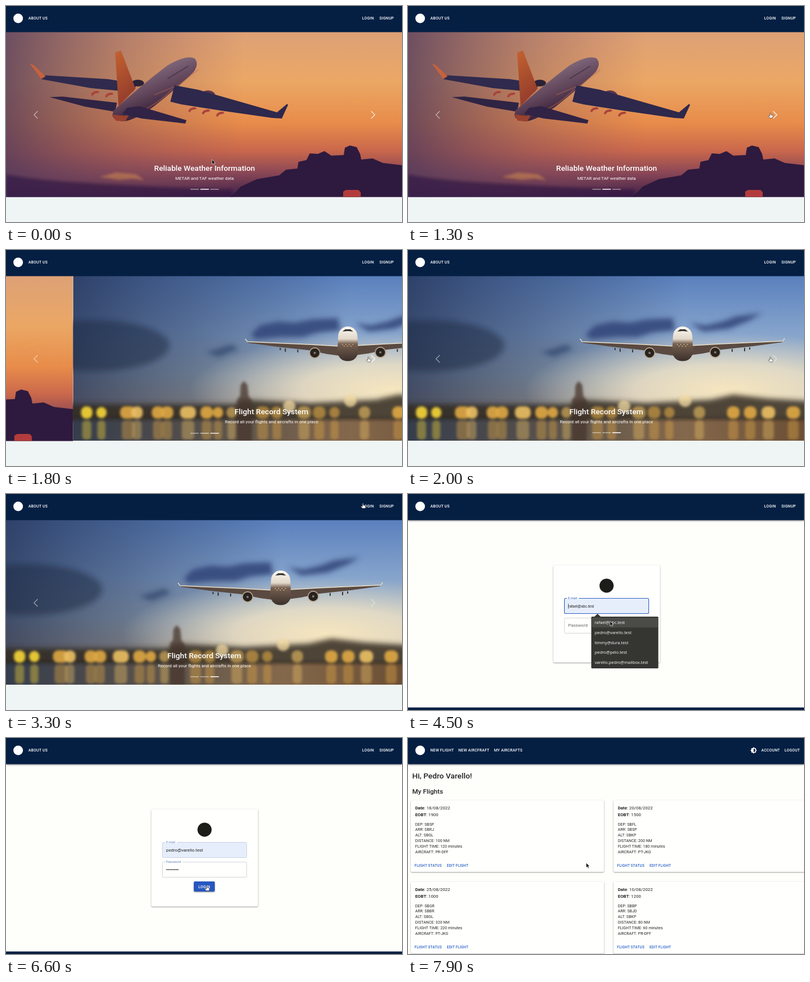
An HTML page that plays this animation: 700 px wide and 384 px high, repeating every 8 s.

```html
<!DOCTYPE html>
<html lang="en">
<head>
<meta charset="utf-8">
<title>Flight records</title>
<style>
html, body { margin: 0; width: 100%; height: 100%; overflow: hidden; background: #fefefb; }
svg { display: block; width: 700px; height: 384px; font-family: Roboto, "Noto Sans", sans-serif; }
.btn { font-size: 6.86px; font-weight: 500; letter-spacing: .0286em; fill: #fff; }
.small { font-size: 6.37px; fill: #2a62c8; }
.h { font-size: 13.7px; font-weight: 500; }
.p { font-size: 7.84px; }
.b { font-size: 6.86px; letter-spacing: .0107em; }
.cap { fill: #fff; text-anchor: middle; }
.menu { font: 7.4px "Open Sans", "Noto Sans", sans-serif; fill: #fff; }
.paper { fill: #fffffd; filter: drop-shadow(0 1px 1px #0006); }
.chev { fill: none; stroke: #fff; stroke-width: 1.2; }
</style>
</head>
<body>
<svg id="stage" viewBox="0 0 700 384">
<defs>
  <linearGradient id="dusk" x2="0" y2="1">
    <stop offset="0" stop-color="#dda176"/><stop offset=".3" stop-color="#eba765"/>
    <stop offset=".55" stop-color="#e88c4a"/><stop offset=".72" stop-color="#c9674c"/>
    <stop offset=".86" stop-color="#874556"/><stop offset="1" stop-color="#3b1f48"/>
  </linearGradient>
  <linearGradient id="duskLeft">
    <stop offset="0" stop-color="#513a5c" stop-opacity=".8"/>
    <stop offset=".3" stop-color="#754a5c" stop-opacity=".4"/>
    <stop offset=".6" stop-color="#8a5060" stop-opacity="0"/>
  </linearGradient>
  <linearGradient id="body" x1=".35" y1=".25" x2=".65" y2=".8">
    <stop offset="0" stop-color="#80677a"/><stop offset=".5" stop-color="#604459"/>
    <stop offset="1" stop-color="#321c35"/>
  </linearGradient>
  <linearGradient id="fin" x2=".3" y2="1">
    <stop offset="0" stop-color="#c4622f"/><stop offset="1" stop-color="#933c2c"/>
  </linearGradient>
  <linearGradient id="sky" x2="0" y2="1">
    <stop offset="0" stop-color="#5a80bd"/><stop offset=".35" stop-color="#86a4cc"/>
    <stop offset=".6" stop-color="#a3b0b8"/><stop offset=".75" stop-color="#b5aa98"/>
  </linearGradient>
  <linearGradient id="skyLeft">
    <stop offset="0" stop-color="#1f2c4e" stop-opacity=".75"/>
    <stop offset=".3" stop-color="#2b3d62" stop-opacity=".5"/>
    <stop offset=".7" stop-color="#2b3d62" stop-opacity="0"/>
  </linearGradient>
  <linearGradient id="water">
    <stop offset="0" stop-color="#353d4c"/><stop offset=".4" stop-color="#5d544c"/>
    <stop offset=".7" stop-color="#84684c"/><stop offset="1" stop-color="#6b4f35"/>
  </linearGradient>
  <radialGradient id="glow">
    <stop offset="0" stop-color="#f6e6bf"/><stop offset=".45" stop-color="#efe3c8" stop-opacity=".8"/>
    <stop offset="1" stop-color="#dcdcd4" stop-opacity="0"/>
  </radialGradient>
  <linearGradient id="jet" x2="0" y2="1">
    <stop offset="0" stop-color="#fbf7ef"/><stop offset=".36" stop-color="#e2d8ca"/>
    <stop offset=".5" stop-color="#766050"/><stop offset="1" stop-color="#3b302c"/>
  </linearGradient>
  <filter id="soft" x="-50%" y="-50%" width="200%" height="200%"><feGaussianBlur stdDeviation="2"/></filter>
  <filter id="haze" x="-50%" y="-80%" width="200%" height="260%"><feGaussianBlur stdDeviation="5"/></filter>
  <clipPath id="photo"><rect y="46" width="700" height="292.6"/></clipPath>
  <clipPath id="tall"><rect y="46" width="700" height="293.6"/></clipPath>
</defs>
<rect width="700" height="384" fill="#fefefb"/>

<g id="home">
  <rect y="46" width="700" height="338" fill="#eff4f4"/>
  <g id="sunset" clip-path="url(#tall)">
    <rect y="46" width="700" height="293.6" fill="url(#dusk)"/>
    <rect y="46" width="700" height="293.6" fill="url(#duskLeft)"/>
    <g filter="url(#soft)">
      <path d="M600 173l25-7 20-2-18 7zM165 304l30-8 35 3 15 11-20-3-25 2z" fill="#f0a24c" opacity=".4"/>
      <path d="M0 300q60 10 130 14t150 8 120 4v16H0z" fill="#2c1840" opacity=".6"/>
    </g>
    <path d="M395 342l20-21 28-13 40-7 12-10 20-2 2-12 14-3 6-12 14 1 12-5 12 8 22-1 2-13 9-4 12 3 6 12 2 10 20-2 18 8 34 4v60z" fill="#2e1a3e"/>
    <path d="M596 340v-10l5-3h22l4 4v9z" fill="#b23c3c"/>
    <path d="M48 110l18 13 114 7 52 8-8 15-74-7-88-16z" fill="#302a4d"/>
    <path d="M42 102l7 3 21 20-8 5z" fill="#c5623e"/>
    <path d="M77 162l23-1 96 11-3 16-53-9z" fill="#2f2444"/>
    <ellipse cx="233" cy="137" rx="11" ry="6" fill="#2b2238"/>
    <ellipse cx="357" cy="159" rx="13" ry="9" fill="#59364a"/>
    <path d="M190 186Q240 140 285 106 318 86 333 93 342 102 332 117 305 144 262 178 228 203 208 205 190 204 188 194z" fill="url(#body)"/>
    <path d="M262 158l44-18 34-27M210 196q45-9 84-48" fill="none" stroke="#b4674f" stroke-width="2" opacity=".45"/>
    <path d="M286 129l36-22" stroke="#3c2840" stroke-width="2" stroke-dasharray="2 1.4"/>
    <path d="M298 141l42 8 139 40 18-15 1.500 2-11 24-17-1-90-13-70-11-20-5z" fill="#2d284c"/>
    <path d="M214 181l21-3 84 25-2 6-77-9-35-8z" fill="#302345"/>
    <path d="M188 193l28 3-5 9-17-1z" fill="#9a412e"/>
    <path d="M193 83l10-4 26 68-30 31z" fill="url(#fin)"/>
    <g id="pods" fill="#a9423b"></g>
    <text class="cap h" x="351" y="293">Reliable Weather Information</text>
    <text class="cap p" x="351" y="309">METAR and TAF weather data</text>
  </g>
  <g id="city">
    <g clip-path="url(#photo)">
      <rect y="46" width="700" height="292.6" fill="url(#sky)"/>
      <rect y="46" width="700" height="292.6" fill="url(#skyLeft)"/>
      <ellipse cx="565" cy="248" rx="360" ry="100" fill="url(#glow)"/>
      <g filter="url(#haze)">
        <ellipse cx="40" cy="170" rx="130" ry="45" fill="#1a273a" opacity=".45"/>
        <path d="M314 150l16-16 32-7 30 2 30-6 46-2 4 22-40 4-26 8-40 0-44 4zM498 130l28 4 30-7 24-9 46-6-24 14-34 14-46 5z" fill="#354a7c" opacity=".9"/>
        <path d="M235 182l45-14 12 8-35 14z" fill="#354a70" opacity=".8"/>
        <path d="M-20 274H285l15-8 120 6 115-6 40-9 60 7 100 6v35H-20z" fill="#33281f" opacity=".85"/>
      </g>
      <rect y="299" width="700" height="40" fill="url(#water)"/>
      <g filter="url(#soft)">
        <path d="M290 340v-74l5-6 1-20 6-7 6 7 2 20 6 8v72z" fill="#47372d" opacity=".75"/>
        <path d="M-10 300H710" stroke="#2b2420" stroke-width="5" opacity=".6"/>
      </g>
      <g id="lights" filter="url(#soft)"></g>
    </g>
    <g id="wings"></g>
    <path d="M468.500 153a17 17 0 0 1 34 0l1.500 28q-3 16.500-18.500 16.500t-18.500-16.500z" fill="url(#jet)"/>
    <path d="M476 145l5-4h9l5 4-9.500-1z" fill="#31302f"/>
    <path d="M475 168h20M478 171h14" stroke="#f6d9a0" stroke-dasharray="2 4"/>
    <text class="cap h" x="350.500" y="291.500">Flight Record System</text>
    <text class="cap p" x="350.800" y="307.500">Record all your flights and aircrafts in one place</text>
  </g>
  <g id="bars"></g>
  <path class="chev" d="M56 187l-6.500 6.500 6.500 6.500" opacity=".55"/>
  <path class="chev" id="next" d="M645.500 187l6.500 6.500-6.500 6.500"/>
</g>

<g id="login">
  <rect class="paper" x="257" y="126.500" width="188.500" height="173" rx="2"/>
  <circle cx="351" cy="163" r="12.500" fill="#1c1c18"/>
  <rect id="mailBox" x="276.500" y="185.500" width="149" height="27" rx="2"/>
  <rect id="mailNotch" x="281" y="184" width="21" height="3" fill="#fffffd"/>
  <text id="mailLabel" x="283"></text>
  <text id="mail" x="283" y="202"></text>
  <path id="caret" d="M283.500 195v9" stroke="#222" stroke-width=".7"/>
  <rect x="276.500" y="220.500" width="149" height="27" rx="2" fill="#fffffd" id="passBox"/>
  <rect id="passNotch" x="281" y="219" width="31" height="3" fill="#fffffd"/>
  <text id="passLabel" x="283"></text>
  <g id="dots" fill="#222"></g>
  <rect x="332" y="255" width="37" height="18" rx="2" fill="#2757c0" style="filter:drop-shadow(0 1px 1px #0007)"/>
  <text class="btn" x="340" y="266.500">LOGIN</text>
  <g id="menu">
    <path d="M329 218.500l6-5.500 6 5.500z" fill="#353531"/>
    <rect x="324" y="218" width="118.500" height="92" rx="1.500" fill="#353531"/>
    <rect id="hover" x="325" width="116.500" height="17.500" fill="#4b4b47"/>
  </g>
  <rect y="379.500" width="700" height="5" fill="#051f43"/>
</g>

<g id="flights">
  <text class="h" x="7.500" y="72" fill="#222">Hi, Pedro Varello!</text>
  <text x="7.500" y="99" fill="#222" font-size="11.760" font-weight="500">My Flights</text>
</g>

<rect id="header" width="700" height="46.500" fill="#051f43"/>
<circle cx="21.500" cy="22" r="8.500" fill="#fff"/>
<g id="guest"></g>
<g id="member">
  <path d="M607 18h8v8h-8zM611 16.300l5.700 5.700-5.700 5.700-5.700-5.700z" fill="#fff"/>
  <path d="M611 19a3 3 0 0 1 0 6z" fill="#051f43"/>
</g>

<g id="cursor">
  <path id="arrow" d="M0 0v8.500l2-1.800 1.400 3 1.500-.7-1.400-2.900h2.700z" fill="#111" stroke="#fff" stroke-width=".6"/>
  <path id="hand" d="M-.8 0q.8-.8 1.600 0v3l3 .8q.9.300.8 1.300l-.5 3.400H-1l-2.600-3.300q.4-1.200 1.600-.4l1.200.7z" fill="#fff" stroke="#222" stroke-width=".6"/>
  <path id="beam" d="M-1.500-4h3M0-4v8M-1.500 4h3" stroke="#333" stroke-width=".7"/>
</g>
</svg>
<script>
const $ = id => document.getElementById(id);
const add = (id, html) => $(id).insertAdjacentHTML('beforeend', html);
const show = (id, on) => $(id).style.display = on ? '' : 'none';
const set = (id, attrs) => { for (const k in attrs) $(id).setAttribute(k, attrs[k]); };
const text = (cls, x, y, s) => `<text class="${cls}" x="${x}" y="${y}">${s}</text>`;
const ramp = (t, a, b) => Math.min(1, Math.max(0, (t - a) / (b - a)));
const ease = x => x * x * (3 - 2 * x);
const mix = (a, b, p) => a + (b - a) * p;

// Photo details
for (const [x, y] of [[157, 154], [182, 157], [329, 183], [353, 187], [378, 191]])
  add('pods', `<path d="M${x - 7} ${y + 4}q3-8 13-7l2 3-9 2-3 4z"/>`);
const lamps = [[24, 10], [50, 9], [97, 14], [113, 10], [150, 11], [166, 11], [203, 14], [236, 11], [256, 9], [280, 9],
  [335, 12], [360, 10], [408, 12], [435, 11], [462, 9], [515, 10], [575, 11], [605, 11], [637, 12], [681, 12]];
lamps.forEach(([x, r], i) => {
  const color = i < 2 ? '#f6d638' : i % 3 ? '#e0a844' : '#ecc064';
  const h = Math.min(r + 1, 11);
  add('lights', `<rect x="${x - r}" y="${289 - h}" width="${2 * r}" height="${2 * h}" rx="9" fill="${color}" opacity="${x < 270 || x > 560 ? .9 : .6}"/>
    <rect x="${x - r * .8}" y="303" width="${r * 1.6}" height="34" rx="6" fill="${color}" opacity=".4"/>`);
});
for (const [x, y] of [[382, 278], [490, 268]])
  add('lights', `<circle cx="${x}" cy="${y}" r="11" fill="#f2d9a0" opacity=".75"/>`);
const wing = `<path d="M303 157l6 6 110 5 52 3v17l-22-3-34-7-55-6-51-7z" fill="#5a4a41"/>
  <path d="M304 158l4 5 110 5 52 3" fill="none" stroke="#eadfcb" stroke-width="1.400"/>
  <path d="M375 175v6M397 177v5M366 174v4" stroke="#40362f" stroke-width="2"/>
  <circle cx="427" cy="183" r="10" fill="#bba890"/><circle cx="427" cy="183" r="8.300" fill="#28231f"/>
  <circle cx="427" cy="183" r="2" fill="#8b7c6d"/>`;
add('wings', wing + `<g transform="matrix(-1 0 0 1 970 -1)">${wing}</g>`);
for (let i = 0; i < 3; i++)
  add('bars', `<rect x="${326 + 17.6 * i}" y="325" width="15" height="1.500" fill="#fff"/>`);
const bars = [...$('bars').children];

// Navigation, form and flight cards
const nav = (id, items) => items.forEach(([x, s]) => add(id, text('btn', x, 24.4, s)));
nav('guest', [[39.5, 'ABOUT US'], [629.5, 'LOGIN'], [660, 'SIGNUP']]);
nav('member', [[39.5, 'NEW FLIGHT'], [89, 'NEW AIRCFRAFT'], [152, 'MY AIRCRAFTS'], [624.5, 'ACCOUNT'], [665.5, 'LOGOUT']]);

const mails = ['rafael@abc.test', 'pedro@varello.test', 'timmy@dura.test', 'pedro@pelo.test', 'varello.pedro@mailbox.test'];
mails.forEach((m, i) => add('menu', text('menu', 330, 231.3 + 17.7 * i, m)));
for (let i = 0; i < 8; i++) add('dots', `<circle cx="${284.5 + 2.75 * i}" cy="234" r="1"/>`);

const flights = [
  ['18/08/2022', 1900, 'SBSP', 'SBRJ', 'SBGL', 100, 120, 'PR-DFF'],
  ['20/08/2022', 1500, 'SBFL', 'SBSP', 'SBKP', 200, 180, 'PT-JKG'],
  ['25/08/2022', 1000, 'SBGR', 'SBBR', 'SBGL', 320, 220, 'PT-JKG'],
  ['10/08/2022', 1200, 'SBBP', 'SBJD', 'SBKP', 80, 60, 'PR-DFF']];
flights.forEach(([date, eobt, dep, arr, alt, dist, mins, craft], i) => {
  const x = i % 2 * 358.3, y = (i >> 1) * 145.2;
  const lines = [`DEP: ${dep}`, `ARR: ${arr}`, `ALT: ${alt}`, `DISTANCE: ${dist} NM`, `FLIGHT TIME: ${mins} minutes`, `AIRCRAFT: ${craft}`];
  add('flights', `<g transform="translate(${x} ${y})" fill="#222">
    <rect class="paper" x="5" y="110.500" width="341.500" height="127.500" rx="2"/>` +
    text('p', 12.7, 127.2, `<tspan font-weight="700">Date</tspan>: ${date}`) +
    text('p', 12.7, 138.7, `<tspan font-weight="700">EOBT</tspan>: ${eobt}`) +
    lines.map((s, k) => text('b', 12.7, 155.5 + 9.8 * k, s)).join('') +
    text('btn small', 11.5, 228.6, 'FLIGHT STATUS') + text('btn small', 68.7, 228.6, 'EDIT FLIGHT') + '</g>');
});

// Pointer path: time, x, y
const path = [[0, 364, 273], [300, 364, 273], [1100, 640.5, 190.5], [2700, 640.5, 190.5], [3200, 631, 17], [3400, 631, 17],
  [3600, 475, 105], [4000, 345, 199], [4200, 345, 199], [4400, 357, 226], [4600, 357, 226], [4900, 358, 243],
  [6000, 358, 243], [6400, 355, 263], [7300, 355, 263], [7600, 326, 213], [7900, 315, 222], [8000, 315, 222]];

function pointer(t) {
  const i = path.findIndex((k, n) => n && t <= k[0]);
  const [a, b] = [path[i - 1], path[i]], p = ease(ramp(t, a[0], b[0]));
  return [mix(a[1], b[1], p), mix(a[2], b[2], p)];
}

function label(id, s, p, yRest, yTop, color) {
  set(id, { y: mix(yRest, yTop, p), 'font-size': mix(7.84, 5.88, p), fill: color });
  $(id).textContent = s;
}

function draw(t) {
  const home = t < 3400, login = t >= 3400 && t < 6700, member = t >= 6700;
  show('home', home); show('login', login); show('flights', member);
  show('guest', !member); show('member', member);
  $('header').style.filter = home ? '' : 'drop-shadow(0 1px 1.5px #0008)';

  const [x, y] = pointer(t);
  const onNext = home && x > 615 && y > 60;
  const onLink = home && x > 625 && y < 30;
  const onField = login && x > 276 && x < 426 && (t < 4200 ? y > 185 && y < 213 : t >= 5200 && y < 248);
  const onButton = login && t > 5200 && y > 255;
  const hand = onNext || onLink || onButton;
  set('cursor', { transform: `translate(${x} ${y})` });
  show('hand', hand); show('beam', onField); show('arrow', !hand && !onField);

  const swap = ramp(t, 1357, 1957), slide = ease(swap);
  set('sunset', { transform: `translate(${-700 * slide} 0)` });
  set('city', { transform: `translate(${700 - 700 * slide} 0)` });
  show('sunset', slide < 1); show('city', slide > 0);
  set('bars', { transform: `translate(0 ${slide < 1 ? 0 : -1})` });
  [.5, 1 - swap / 2, .5 + swap / 2].forEach((o, i) => bars[i].setAttribute('opacity', o));
  set('next', { opacity: slide === 1 ? .45 : onNext ? .95 : .8 });

  const focus = t >= 4100 && t < 5500, open = t >= 4200 && t < 5200, filled = t >= 5200;
  const pick = t >= 4750 ? 1 : 0, preview = open && t >= 4400;
  const up = ease(ramp(t, 4000, 4200)), passUp = ease(ramp(t, 5400, 5700));
  set('mailBox', {
    fill: preview || filled ? '#e7eefb' : '#fffffd',
    stroke: focus ? '#2d60c4' : filled ? '#b3c2df' : '#c4c4c2', 'stroke-width': focus ? 1.1 : .7
  });
  set('passBox', { stroke: '#c2c4c6', 'stroke-width': .7 });
  show('mailNotch', up > .5); show('passNotch', passUp > .5);
  label('mailLabel', 'E-mail', up, 202, 187, focus ? '#2d60c4' : filled ? '#5d7bc4' : '#666');
  label('passLabel', 'Password', passUp, 236.2, 222, passUp > .5 ? '#5d7bc4' : '#666');
  $('mail').textContent = filled ? mails[1] : preview ? mails[pick] : '';
  $('mail').style.font = filled ? '7.84px Roboto, sans-serif' : '6.53px "Liberation Sans", Arial, sans-serif';
  set('mail', { fill: '#222' });
  show('caret', focus && !filled);
  show('dots', t >= 5500);
  show('menu', open);
  show('hover', preview);
  set('hover', { y: 219.8 + 17.7 * pick });
}

function tick() {
  draw(Math.floor(performance.now() % 8000 / 100) * 100);
  requestAnimationFrame(tick);
}
tick();
</script>
</body>
</html>
```
